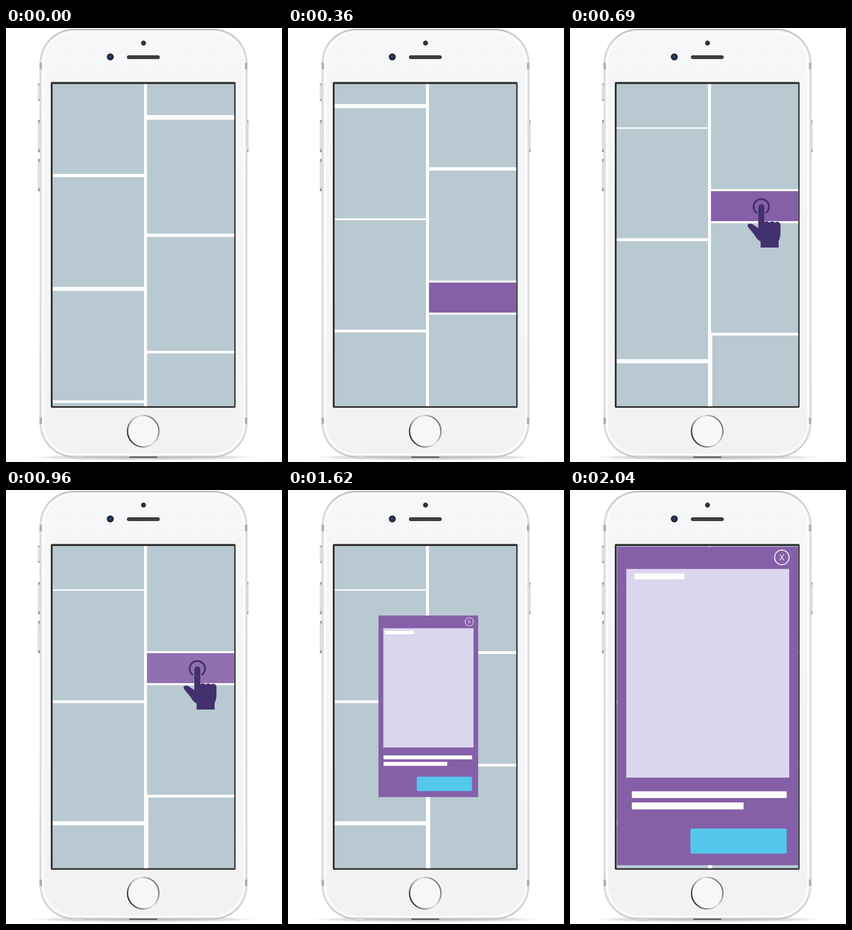
An HTML page that plays this animation: 598x937 px, repeating every 4040 ms.

```html
<!DOCTYPE html>
<html lang="en">
<head>
<meta charset="utf-8">
<title>Feed tap to pop-up</title>
<style>
  html, body { margin: 0; width: 100%; height: 100%; overflow: hidden; background: #fff; }
  svg { display: block; width: 598px; height: 937px; }
  text { font-family: "Open Sans", sans-serif; fill: #fff; text-anchor: middle; }
</style>
</head>
<body>
<svg viewBox="0 0 598 937">
  <defs>
    <linearGradient id="rim" x2="0" y2="1">
      <stop offset="0" stop-color="#a9aaab"/><stop offset=".07" stop-color="#c9cbcc"/>
      <stop offset=".5" stop-color="#d3d5d5"/><stop offset=".94" stop-color="#c9cbcc"/>
      <stop offset="1" stop-color="#b3b5b6"/>
    </linearGradient>
    <linearGradient id="face" x2="0" y2="1">
      <stop offset="0" stop-color="#f5f7f9"/><stop offset="1" stop-color="#f1f2f4"/>
    </linearGradient>
    <linearGradient id="ring" x1="0" y1=".75" x2="1" y2=".25">
      <stop offset="0" stop-color="#222"/><stop offset=".35" stop-color="#aaa"/>
      <stop offset=".6" stop-color="#e2e2e2"/><stop offset="1" stop-color="#666"/>
    </linearGradient>
    <linearGradient id="metal" x2="0" y2="1">
      <stop offset="0" stop-color="#777"/><stop offset=".12" stop-color="#e6e7e8"/>
      <stop offset=".88" stop-color="#e6e7e8"/><stop offset="1" stop-color="#666"/>
    </linearGradient>
    <radialGradient id="shadow">
      <stop offset="0" stop-color="#999" stop-opacity=".7"/>
      <stop offset=".75" stop-color="#bbb" stop-opacity=".4"/>
      <stop offset="1" stop-color="#fff" stop-opacity="0"/>
    </radialGradient>
    <clipPath id="screen"><rect x="101" y="121" width="393.5" height="695.5"/></clipPath>
  </defs>

  <ellipse cx="298" cy="927" rx="265" ry="7" fill="url(#shadow)"/>

  <g fill="url(#metal)" stroke="#b5b6b7" stroke-width=".7">
    <rect x="69.5" y="120" width="5" height="37" rx="1.5"/>
    <rect x="69.5" y="199" width="5" height="69" rx="1.5"/>
    <rect x="69.5" y="283" width="5" height="69" rx="1.5"/>
    <rect x="521" y="199" width="4" height="69" rx="1.5"/>
  </g>
  <rect x="73" y="2" width="450" height="925" rx="74" fill="url(#rim)"/>
  <rect x="74.5" y="4" width="447" height="921" rx="72" fill="#e3e5e5"/>
  <rect x="78" y="6.5" width="440" height="916" rx="69" fill="#fdfdfd"/>
  <rect x="82" y="10" width="432" height="909" rx="66" fill="url(#face)"/>
  <path d="M72.5 75h5.5v14h-5.5zM517.5 75h5.5v14h-5.5zM72.5 841h5.5v14h-5.5zM517.5 841h5.5v14h-5.5z" fill="#aeb0b1"/>
  <rect x="267" y="925" width="61" height="3" rx="1.5" fill="#555"/>
  <rect x="145" y="924.5" width="23" height="4.5" rx="2" fill="#d8d9da" stroke="#aaa" stroke-width=".6"/>

  <circle cx="298" cy="32.5" r="5.4" fill="#333"/>
  <rect x="262" y="59" width="71" height="8" rx="4" fill="#333"/>
  <rect x="265" y="61.5" width="65" height="3" rx="1.5" fill="#444"/>
  <circle cx="226" cy="62.5" r="7.6" fill="#262733"/>
  <circle cx="226" cy="62.5" r="4.2" fill="#1c3560"/>
  <circle cx="225" cy="61.5" r="1.6" fill="#47689c"/>
  <circle cx="297.3" cy="870.5" r="34" fill="#f6f7f8" stroke="url(#ring)" stroke-width="3"/>

  <rect x="97" y="116.5" width="400.5" height="703.5" rx="3" fill="#333"/>
  <g clip-path="url(#screen)">
    <rect x="101" y="121" width="394" height="696" fill="#b9c9d1"/>
    <g id="feed"></g>
    <g id="hand" fill="#43306f">
      <path d="M405 399.5A16.6 16.6 0 1 1 424 399.5" fill="none" stroke="#43306f" stroke-width="4"/>
      <path d="M408 387a6.5 6.5 0 0 1 13 0V419Q427 415 432 420Q438 415 444 420Q452 415 456 424V442Q456 452 452 460V474H413V461Q405 457 400 447L386 430Q383 425 387 423Q391 421 396 424L408 432Z"/>
    </g>
    <g id="growing"></g>
    <g id="opened"></g>
  </g>
</svg>
<script>
const LOOP = 4040, STEP = 30, SCROLL = 592;
const PURPLE = "#8560a8", LILAC = "#dbd5ee", CYAN = "#54c7ec", WHITE = "#fff";
const $ = id => document.getElementById(id);
const clamp = v => Math.max(0, Math.min(1, v));
const box = (x0, y0, x1, y1, fill, rx = 0) =>
  `<rect x="${x0}" y="${y0}" width="${x1 - x0}" height="${y1 - y0}" fill="${fill}" rx="${rx}"/>`;

const closeButton = (x, y, r) =>
  `<circle cx="${x}" cy="${y}" r="${r}" fill="none" stroke="#fff" stroke-width="${r / 8}"/>
   <text x="${x}" y="${y + r * .43}" font-size="${r * 1.17}">X</text>`;

// Pop-up while growing, centred on the origin at 8/14 of its full size.
$("growing").innerHTML = box(-108, -196, 108, 196, PURPLE)
  + box(-97.5, -168.5, 98, 89, LILAC) + box(-93.5, -163, -31.5, -155.5, WHITE)
  + box(-97, 106, 95, 114.5, WHITE) + box(-97, 120, 41, 128.5, WHITE)
  + box(-25, 152, 94.5, 183, CYAN, 2) + closeButton(88.7, -182.5, 9);

$("opened").innerHTML = box(102, 122.5, 494.5, 810, PURPLE)
  + box(122, 170.5, 475, 621, LILAC) + box(139.5, 180, 248, 193, WHITE)
  + box(134, 650.5, 469.5, 665, WHITE) + box(134, 674.5, 376, 689.5, WHITE)
  + box(261, 731, 469.5, 785, CYAN, 4) + closeButton(459, 145.5, 15.7);

function feed(scroll, showBar, flash) {
  const drift = 2.5 * scroll / SCROLL;
  const left = [[315, 322], [559, 567.5], [804 + drift, 809.5], [1046, 1052], [1307, 1316]];
  const right = [[188, 198], [444, 451], [697 - drift, 702.5]];
  if (showBar) right.push([940, 944.3], [1009, 1013.5], [1250, 1256]);
  else right.push([940, 946], [1183, 1189]);
  const lastGap = right[right.length - 1][0];
  const rows = (gaps, x0, x1) => gaps.map(([a, b]) => box(x0, a, x1, b, WHITE)).join("");
  const bar = box(305.5, 944.3, 495, 1009, PURPLE) + box(305.5, 944.3, 495, 1009, `rgba(255,255,255,${flash})`);
  $("feed").innerHTML = `<g transform="translate(0 ${-scroll})">`
    + rows(left, 101, 300) + rows(right, 305, 495)
    + box(299, 0, 305.5, 1500, WHITE) + box(299, lastGap, 308.3, 1500, WHITE)
    + (showBar ? bar : "") + "</g>";
}

const show = (id, on) => $(id).setAttribute("visibility", on ? "visible" : "hidden");

function draw(time) {
  const t = Math.floor(time / STEP) * STEP;
  const flash = .15 * clamp(Math.min((t - 840) / 180, (1170 - t) / 150));
  feed(SCROLL * clamp(t / 540), t < 1440, flash);
  show("hand", t >= 690 && t < 1440);
  show("growing", t >= 1410 && t < 1800);
  show("opened", t >= 1800);
  const k = (t - 1410) / STEP;
  $("growing").setAttribute("transform",
    `translate(${304.5 - .07 * k} ${469.5 - .36 * k}) scale(${Math.max(0, k + 1) / 8})`);
}

const start = performance.now();
function tick() {
  draw((performance.now() - start) % LOOP);
  requestAnimationFrame(tick);
}
tick();
</script>
</body>
</html>
```
